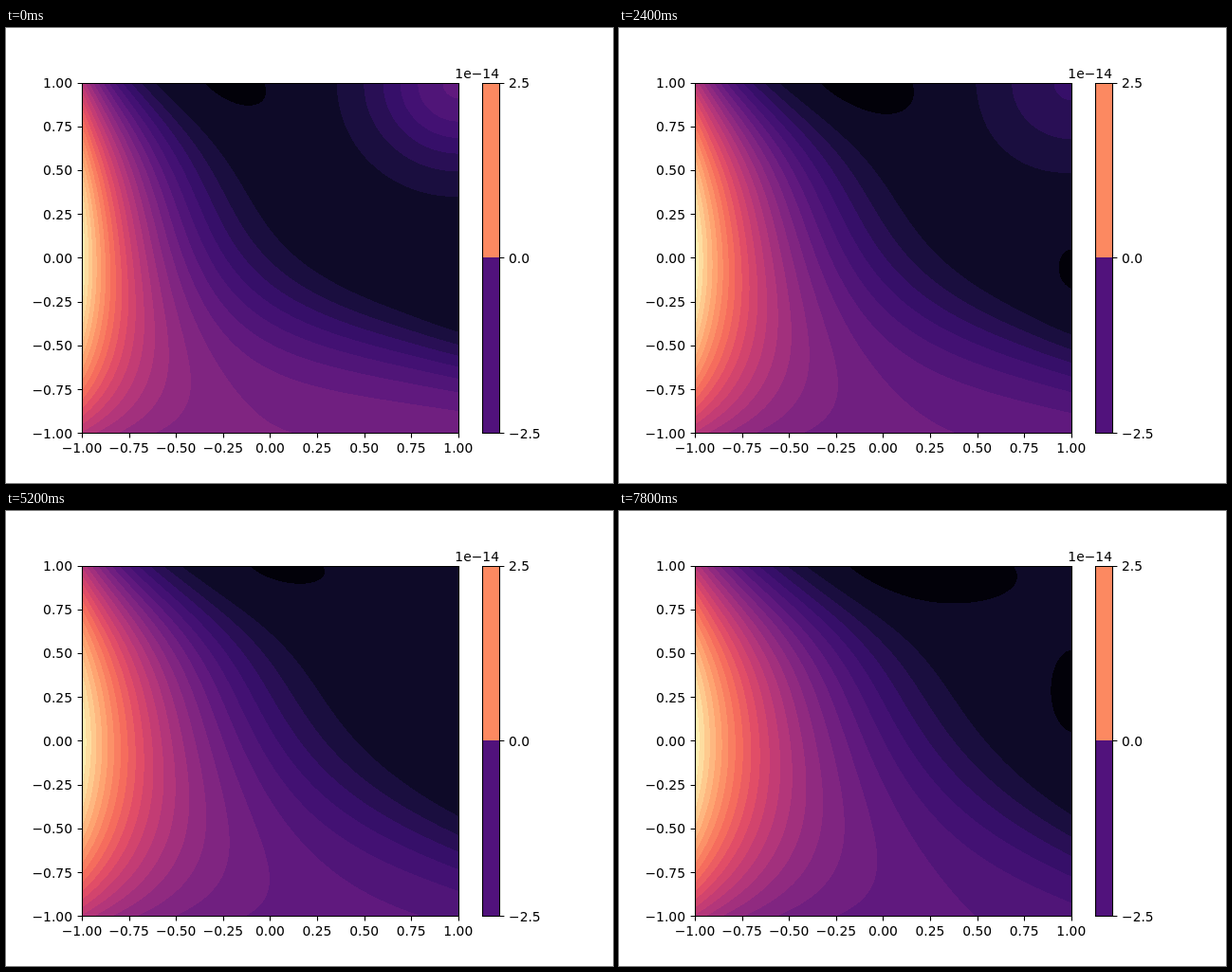
These frames come from a looping animation (640 px wide and 480 px high, 8000 ms). An HTML page with a canvas:

```html
<!DOCTYPE html>
<html lang="en">
<head>
<meta charset="utf-8">
<title>Contour plot</title>
<style>
  html, body { margin: 0; width: 100%; height: 100%; overflow: hidden; background: #fff; }
  canvas { position: absolute; left: 80px; top: 58px; }
  svg { position: absolute; left: 0; top: 0; }
  text { font: 13.89px "DejaVu Sans", sans-serif; }
  path { fill: none; stroke: #000; stroke-width: 1.11; }
</style>
</head>
<body>
<canvas id="field" width="398" height="370"></canvas>
<svg id="axes" width="640" height="480" viewBox="0 0 640 480"></svg>
<script>
const LOOP = 8000, STEP = 200, SPAN = 7800;
const BANDS = 25, FLOOR = 1.2;
const canvas = document.getElementById('field');
const ctx = canvas.getContext('2d');
const { width: W, height: H } = canvas;

// time, depth of the two darkest pools
const POOL_KEYS = [[0, .15], [4200, .35], [5200, .1], [6200, .5], [SPAN, .3]];

const MAGMA = '000004 140e36 3b0f70 641a80 8c2981 b73779 de4968 f7705c fe9f6d fecf92 fcfdbf'
  .split(' ').map(hex => [0, 2, 4].map(i => parseInt(hex.slice(i, i + 2), 16)));

const mix = (a, b, k) => a + (b - a) * k;
const sigmoid = v => 1 / (1 + Math.exp(-v));
const bell = (dx, dy) => Math.exp(-dx * dx - dy * dy);

function magma(u) {
  const i = Math.min(MAGMA.length - 2, Math.floor(u * 10));
  return MAGMA[i].map((c, n) => Math.round(mix(c, MAGMA[i + 1][n], u * 10 - i)));
}

const palette = Array.from({ length: BANDS }, (_, band) => {
  const u = Math.max((band + .25) / BANDS, .25 * (band / 6) ** .7);
  const [r, g, b] = magma(u);
  return (255 << 24 | b << 16 | g << 8 | r) >>> 0;
});

function poolAt(time) {
  const i = Math.max(1, POOL_KEYS.findIndex(([t]) => time <= t));
  const [t0, a] = POOL_KEYS[i - 1], [t1, b] = POOL_KEYS[i];
  return mix(a, b, (time - t0) / (t1 - t0));
}

// Heat decays from the left edge onto a shelf that tilts and sinks with time.
function fieldAt(time) {
  const q = time / SPAN, early = (1 - q) ** 2;
  const pool = poolAt(time);
  const shelfHeight = 9 + 2 * early;
  const shelfBase = mix(-.31, -.13, q), shelfSlope = mix(-.25, -.47, q);
  const sharpness = mix(3.8, 2.4, q);
  const corner = Math.max(0, 6 - 10 * q);
  const topX = mix(-.18, .18, q), topWidth = mix(.32, .57, q);
  const rightY = mix(-.18, .27, q);

  return y => {
    const edge = 26.3 - 12 * y * y;
    const decay = 1.8 + .8 * early + 1.4 * Math.max(0, y) ** 4;
    return x => {
      const shelf = shelfHeight * sigmoid((sharpness + 2 * x) * (shelfBase + shelfSlope * x - y));
      const heat = mix(shelf, edge, Math.exp(-decay * (x + 1))) - 1.5;
      const smooth = FLOOR + Math.log1p(Math.exp(2 * (heat - FLOOR))) / 2;
      const depth = 1 - y;
      return smooth
        + corner * bell((1 - x) / .46, depth / .46)
        - (pool + .15) * bell((x - topX - .6 * depth) / topWidth, depth / .25)
        - pool * bell((1 - x) / .2, (y - rightY) / .4);
    };
  };
}

const image = ctx.createImageData(W, H);
const pixels = new Uint32Array(image.data.buffer);

function draw(time) {
  const field = fieldAt(time);
  for (let j = 0, p = 0; j < H; j++) {
    const row = field(1 - 2 * j / (H - 1));
    for (let i = 0; i < W; i++) {
      const level = Math.floor(row(2 * i / (W - 1) - 1));
      pixels[p++] = palette[Math.max(0, Math.min(BANDS - 1, level))];
    }
  }
  ctx.putImageData(image, 0, 0);
}

function drawAxes() {
  const snap = v => Math.floor(v + .5) + .5;
  const label = (x, y, anchor, s) => `<text x="${x}" y="${y}" text-anchor="${anchor}">${s}</text>`;
  const number = (v, digits) => v.toFixed(digits).replace('-', '\u2212');
  const baseline = y => Math.round(y + 5.5);
  let ticks = '', labels = '';
  for (let i = 0; i <= 8; i++) {
    const x = 80 + i * 49.6, y = 427.2 - i * 46.2, s = number(i / 4 - 1, 2);
    ticks += `M${snap(x)} 427.5v4.9M80.5 ${snap(y)}h-4.9`;
    labels += label(x, 448, 'middle', s) + label(70, baseline(y), 'end', s);
  }
  [-2.5, 0, 2.5].forEach((v, i) => {
    const y = 427.2 - i * 184.8;
    ticks += `M520.5 ${snap(y)}h4.9`;
    labels += label(530, baseline(y), 'start', number(v, 1));
  });
  labels += label(520, 53, 'end', '1e\u221214');
  document.getElementById('axes').innerHTML =
    '<rect x="502" y="58" width="18" height="184" fill="#fc8961"/>' +
    '<rect x="502" y="242" width="18" height="185" fill="#51127c"/>' +
    `<path d="M80.5 58.5H477.5V427.5H80.5ZM502.5 58.5H520.5V427.5H502.5Z${ticks}"/>` + labels;
}

drawAxes();
let shown = -1;
const start = performance.now();
function tick(now) {
  const time = Math.floor(Math.max(0, now - start) % LOOP / STEP) * STEP;
  if (time !== shown) draw(shown = time);
  requestAnimationFrame(tick);
}
tick(start);
</script>
</body>
</html>
```
